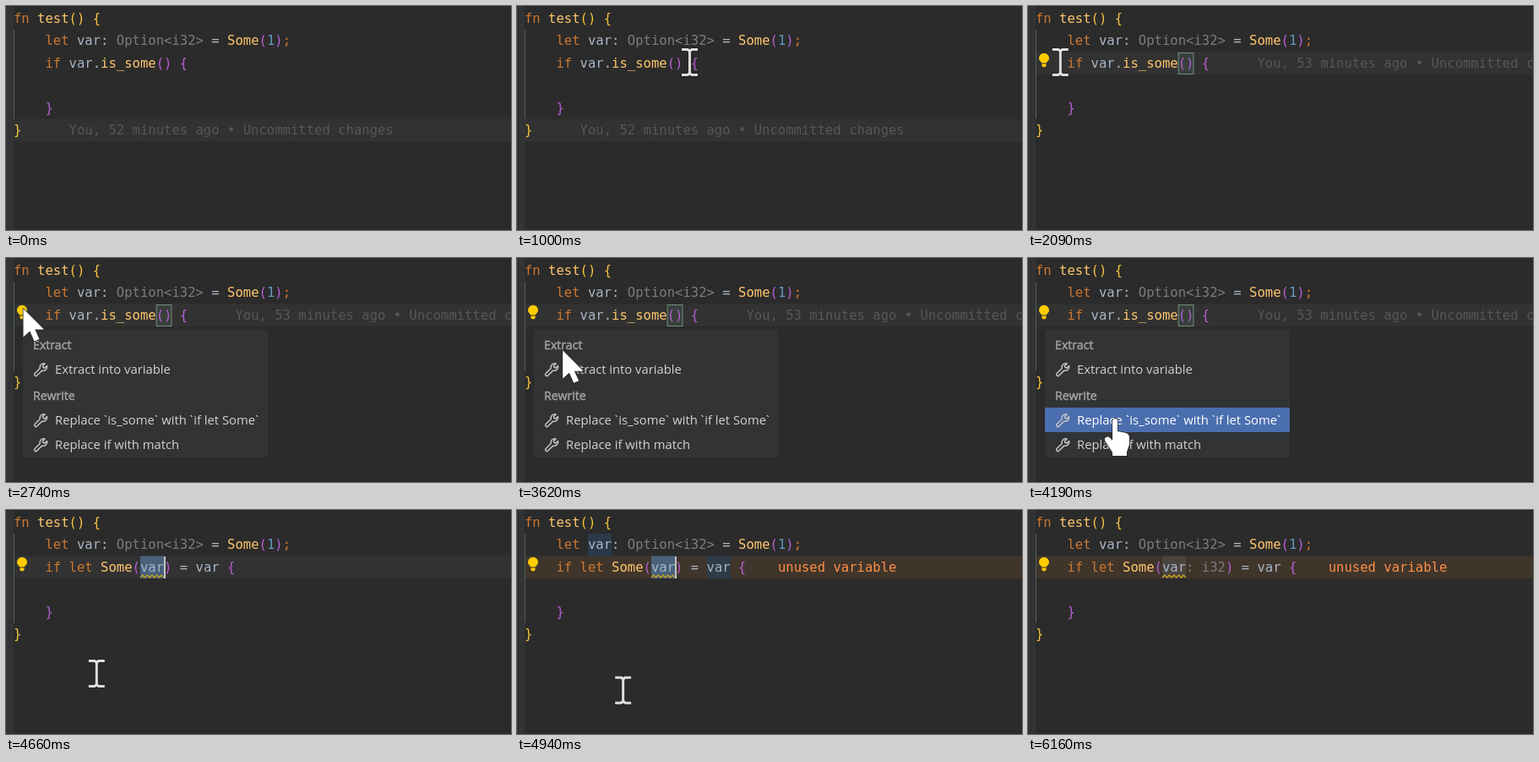
An HTML page for the animation above (6210 ms loop, 598 by 265 pixels).

```html
<!DOCTYPE html>
<html lang="en">
<head>
<meta charset="utf-8">
<style>
  html, body { margin: 0; width: 100%; height: 100%; overflow: hidden; background: #2b2b2b; }
  svg { display: block; width: 598px; height: 265px; }
  .code { font: 15.57px "DejaVu Sans Mono", "Noto Sans Mono", monospace; white-space: pre; }
  .menu { font: 14.8px "Open Sans", "Noto Sans", sans-serif; fill: #d2d2d2; white-space: pre; }
  .tick { font-family: Roboto, sans-serif; }
  .head { font-size: 14.2px; fill: #a0a1a2; stroke: #a0a1a2; stroke-width: .5px; }
</style>
</head>
<body>
<svg id="stage" viewBox="0 0 598 265" xmlns="http://www.w3.org/2000/svg"></svg>
<script>
const LOOP = 6210;
const LEFT = 9, COL = 9.372, ROW = 26.4;
const C = {
  key: '#cc7832', fn: '#ffc66d', gold: '#f9c63d', pair: '#b760d6', num: '#6897bb',
  text: '#a9b7c6', hint: '#7b7c7d', blame: '#555759', warn: '#ff8f45'
};
const stage = document.getElementById('stage');

function add(parent, tag, attrs, text) {
  const el = document.createElementNS('http://www.w3.org/2000/svg', tag);
  for (const k in attrs) el.setAttribute(k, attrs[k]);
  if (text) el.textContent = text;
  parent.appendChild(el);
  return el;
}
const group = (parent = stage) => add(parent, 'g', {});
const rect = (g, x, y, width, height, fill) => add(g, 'rect', { x, y, width, height, fill });
const colX = col => LEFT + col * COL;
const rowY = row => 1.6 + row * ROW;

// Runs are [text, colour, weight] triples laid out from one column.
function code(g, row, col, ...runs) {
  for (const [text, fill, weight = 400] of runs) {
    add(g, 'text', { class: 'code', x: colX(col), y: rowY(row) + 18.4, fill, 'font-weight': weight }, text);
    col += text.length;
  }
}
function wordBox(g, row, col, fill) {
  return rect(g, colX(col), rowY(row), 3 * COL, ROW, fill);
}
const show = (el, on) => el.setAttribute('visibility', on ? 'inherit' : 'hidden');

// Editor background
rect(stage, 0, 0, 598, 265, '#2b2b2b');
rect(stage, 0, 0, 9, 265, '#313335');
const activeLine = rect(stage, 9, 0, 589, ROW, '#323232');
rect(stage, 9, 28, 1, 105.5, '#525e58');

const words = group();
wordBox(words, 1, 8, '#2b3a49');
const secondWord = wordBox(words, 2, 23, '#2e3b48');
const selection = wordBox(stage, 2, 16, '#48627c');

// Code shared by both states
code(stage, 0, 0, ['fn ', C.key], ['test', C.fn], ['() {', C.gold]);
code(stage, 1, 4, ['let ', C.key], ['var:', C.text], [' Option<i32>', C.hint], [' = ', C.text],
  ['Some', C.fn], ['(', C.pair], ['1', C.num], [')', C.pair], [';', C.key]);
code(stage, 4, 4, ['}', C.pair]);
code(stage, 5, 0, ['}', C.gold]);

const blameEnd = group();
code(blameEnd, 5, 7, ['You, 52 minutes ago • Uncommitted changes', C.blame]);
const blameIf = group();
code(blameIf, 2, 28, ['You, 53 minutes ago • Uncommitted changes', C.blame]);

const before = group();
const match = add(before, 'rect', {
  x: colX(18) + .5, y: 55.5, width: 2 * COL - 1, height: 25, fill: '#39403c', stroke: '#778c81'
});
code(before, 2, 4, ['if ', C.key], ['var.', C.text], ['is_some', C.fn], ['()', C.pair], [' {', C.pair]);

const after = group();
code(after, 2, 4, ['if let ', C.key], ['Some', C.fn], ['(', C.pair], ['var', C.text]);
add(after, 'path', {
  d: `M${colX(16)} 80` + 'l2.8 -3l2.8 3'.repeat(5),
  fill: 'none', stroke: '#c9a51c', 'stroke-width': 1.2
});
const typeHint = group(after);
code(typeHint, 2, 19, [': i32', C.hint]);
const tail = group(after);
code(tail, 2, 19, [')', C.pair], [' = var ', C.text], ['{', C.pair]);
const warning = group(tail);
code(warning, 2, 32, ['unused variable', C.warn, 700]);

const caret = rect(stage, 0, 55, 2, 26, '#c4c4c4');

const bulb = group();
add(bulb, 'path', {
  d: 'M16.3 67.5C15.8 66 13 65 13 61.8a6 6 0 0 1 12 0C25 65 22.2 66 21.7 67.5zM16.4 68.6h5.2v2.1l-1.2 1.5h-2.8l-1.2-1.5z',
  fill: '#ffcc00'
});

// Quick-fix menu
const menu = group();
rect(menu, 19, 85, 292, 151.5, '#29292a');
rect(menu, 20, 85, 290, 151, '#313335');
const header = (y, text) => add(menu, 'text', { class: 'menu head', x: 32, y }, text);
function item(top, text) {
  const bar = rect(menu, 20, top, 290, 29, '#4b6eaf');
  add(menu, 'path', {
    d: 'M2 12.5L7.6 7A4.3 4.3 0 0 1 13 1.8L10.5 4.4L11.2 6L12.8 6.6L15.3 4.2A4.3 4.3 0 0 1 10 9.4L4.3 14.8A1.6 1.6 0 0 1 2 12.5Z',
    transform: `translate(32 ${top + 6}) scale(1.08)`,
    fill: 'none', stroke: '#c5c5c5', 'stroke-width': 1.4, 'stroke-linejoin': 'round'
  });
  const label = add(menu, 'text', { class: 'menu', x: 58, y: top + 19.5 });
  // Backticks take a face with a narrow grave accent.
  for (const part of text.split(/(`)/)) add(label, 'tspan', part === '`' ? { class: 'tick' } : {}, part);
  return { top, bar, label };
}
header(108, 'Extract');
header(168, 'Rewrite');
const items = [
  item(117, 'Extract into variable'),
  item(177, 'Replace `is_some` with `if let Some`'),
  item(206, 'Replace if with match')
];

// Pointers, each drawn around its hot spot
const pointer = group();
const shape = (d, fill) => add(pointer, 'path', {
  d, fill, stroke: '#222222', 'stroke-width': 1.4, 'stroke-linejoin': 'round', 'paint-order': 'stroke'
});
const pointers = {
  beam: shape('M-9.5 -16.5h7.5l2 1.2l2 -1.2h7.5v3h-6.5l-1.5 1.3v24.4l1.5 1.3h6.5v3h-7.5l-2 -1.2l-2 1.2h-7.5v-3h6.5l1.5 -1.3v-24.4l-1.5 -1.3h-6.5z', '#dedede'),
  arrow: shape('M0 0V33.5L7.8 26.5L13 38.5L19 36L13.8 24.5H24.5Z', '#ffffff'),
  hand: shape('M-4 3a3 3 0 0 1 6 0V15l8 1.5q6 1 6 6v8l-3 9v4.5h-17v-4l-9 -14q-1 -4 3 -4.5q3 0 6 4.5z', '#ffffff')
};

// Pointer path: time, x, y
const path = [
  [330, 165, 262], [480, 190, 205], [640, 214, 125], [800, 213, 82], [950, 207, 66],
  [1000, 204.5, 66.5], [1130, 204.5, 66.5], [1140, 200.5, 64], [1700, 200.5, 64],
  [1880, 120, 66], [2090, 38.5, 66.5], [2200, 20, 62], [2650, 20, 62],
  [2660, 20.5, 60], [3350, 20.5, 60], [3620, 54, 109], [3800, 78, 150], [3960, 97, 183],
  [4190, 104, 190], [4610, 104, 190], [4940, 125.5, 213], [5230, 174.5, 261], [5410, 174.5, 284]
];
function pointerAt(t) {
  const i = path.findIndex(p => p[0] > t);
  if (i < 1) return path[i < 0 ? path.length - 1 : 0].slice(1);
  const [t0, x0, y0] = path[i - 1], [t1, x1, y1] = path[i];
  const k = (t - t0) / (t1 - t0);
  return [x0 + (x1 - x0) * k, y0 + (y1 - y0) * k];
}
const within = (t, a, b) => t >= a && t < b;

function draw(t) {
  const clicked = t >= 1370, open = within(t, 2660, 4610), changed = t >= 4610;
  const warned = t >= 4760, hinted = t >= 5980, faded = t >= 6160;

  activeLine.setAttribute('y', rowY(clicked ? 2 : 5));
  activeLine.setAttribute('fill', warned ? '#40352b' : '#323232');
  show(blameEnd, !clicked);
  show(blameIf, within(t, 1710, 4610));
  show(before, !changed);
  show(match, clicked && !changed);
  show(bulb, t >= 1470);

  show(after, changed);
  show(warning, warned);
  show(typeHint, hinted);
  const shift = `translate(${hinted ? 5 * COL : 0} 0)`;
  tail.setAttribute('transform', shift);
  secondWord.setAttribute('transform', shift);
  show(words, t >= 4860 && !faded);
  show(selection, changed);
  selection.setAttribute('fill', faded ? '#4a443e' : '#48627c');

  show(caret, within(t, 1370, 1900) || within(t, 2420, 2660) || within(t, 4610, 5160) || within(t, 5660, 6160));
  caret.setAttribute('x', changed ? 187 : 196);

  const [x, y] = pointerAt(t);
  const hovered = open && items.find(i => y >= i.top && y < i.top + 29);
  show(menu, open);
  for (const i of items) {
    show(i.bar, i === hovered);
    i.label.style.fill = i === hovered ? '#ffffff' : '';
  }

  let kind = 'beam';
  if (within(t, 2180, 2660) || hovered) kind = 'hand';
  else if (open) kind = 'arrow';
  for (const k in pointers) show(pointers[k], k === kind);
  show(pointer, within(t, 330, 5410));
  pointer.setAttribute('transform', `translate(${x} ${y})`);
}

const start = performance.now();
function tick() {
  draw((performance.now() - start) % LOOP);
  requestAnimationFrame(tick);
}
tick();
</script>
</body>
</html>
```
